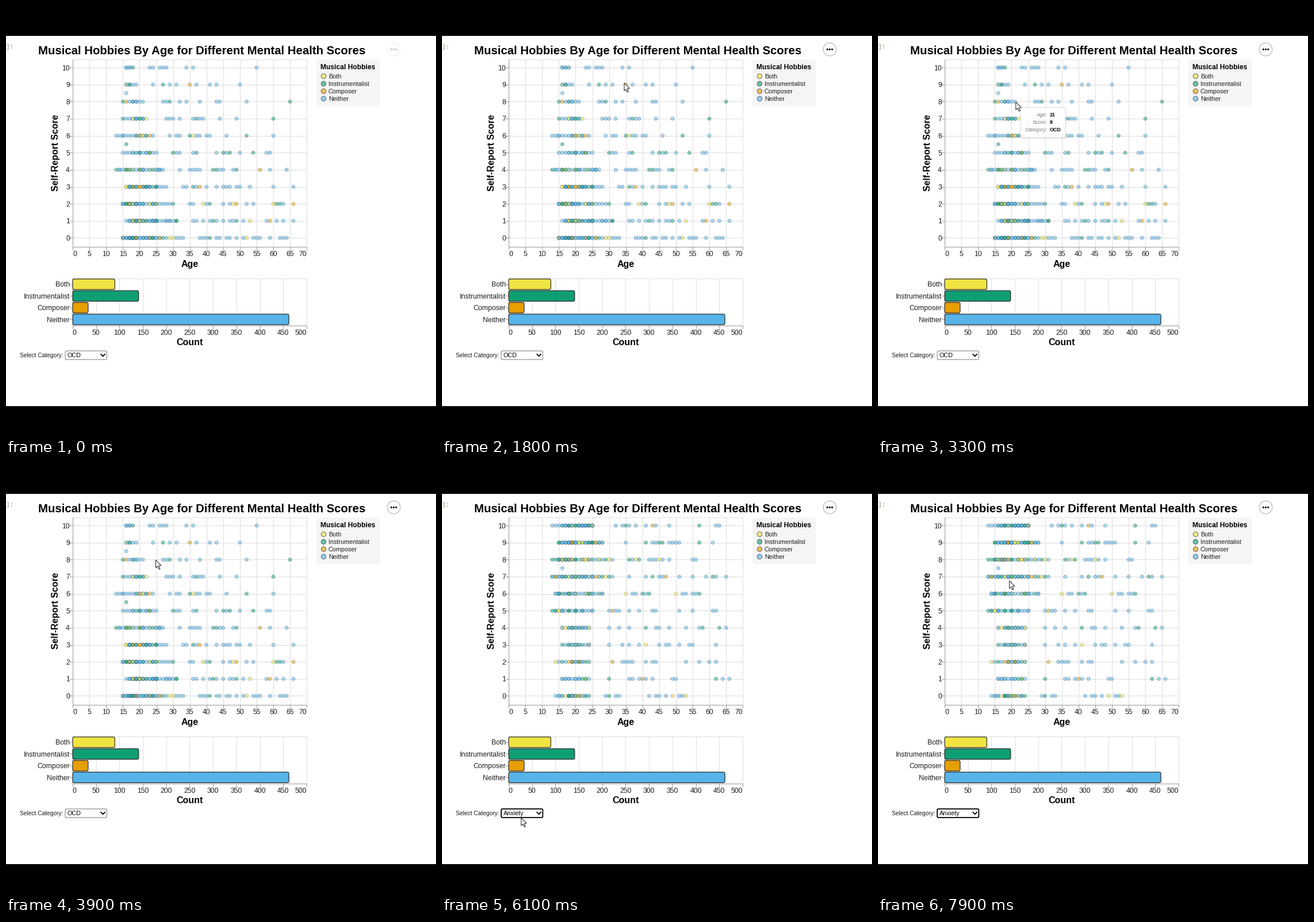
Recreate the animation shown at these times as a matplotlib script. Size 748 px wide and 748 px high, loop 8000 ms.

```python
import numpy as np
import matplotlib.pyplot as plt
from matplotlib.animation import FuncAnimation
from matplotlib.patches import Circle, FancyBboxPatch, Polygon, Rectangle
from matplotlib.transforms import Affine2D

SIZE, DPI = 748, 100
INTERVAL, FRAMES = 100, 80
PT = 72 / DPI
YELLOW, GREEN, ORANGE, BLUE = "#f0e442", "#0f9e73", "#e69f00", "#56b4e9"
GRID, AXIS, INK = "#dddddd", "#999999", "#1c1c1c"

plt.rcParams["font.family"] = "Liberation Sans"
fig = plt.figure(figsize=(SIZE / DPI, SIZE / DPI), dpi=DPI, facecolor="white")
ax = fig.add_axes([0, 0, 1, 1])
ax.set(xlim=(0, SIZE), ylim=(SIZE, 0))
ax.axis("off")


def text(x, y, s, px, ha="left", color=INK, **kw):
    return ax.text(x, y, s, fontsize=px * PT, ha=ha, va="baseline", color=color, **kw)


def line(xs, ys, color=GRID, width=1, z=1):
    return ax.plot(xs, ys, color=color, lw=width * PT, zorder=z)[0]


def box(x, y, w, h, r, fill, edge="none", width=1, z=2, **kw):
    style = f"round,pad=0,rounding_size={r}"
    patch = FancyBboxPatch((x, y), w, h, boxstyle=style, fc=fill, ec=edge,
                           lw=width * PT, zorder=z, **kw)
    return ax.add_patch(patch)


def age_x(age):
    return 116.2 + 5.814 * age


def score_y(score):
    return 403.4 - 29.63 * score


class Scores:
    """Each score has an unbroken run of young ages and a thinning tail of older ones."""

    def __init__(self, seed, oldest, crowd, tail, reach, halves):
        rng = np.random.default_rng(seed)
        self.marks = [(16, score, color) for score, color in halves]
        for score in range(11):
            last = int(oldest(score))
            for age in range(rng.integers(13, 17), last + 1):
                extra = rng.poisson(crowd(score) * np.exp(-((age - 19.5) / 6) ** 2))
                self.add(rng, [age] * (1 + extra), score, .6)
            older = np.arange(last + 5, 67)
            weight = np.exp(-(older - older[0]) / reach(score))
            ages = rng.choice(older, tail(score), replace=False, p=weight / weight.sum())
            self.add(rng, ages, score, .76)
        self.draw()

    def add(self, rng, ages, score, blue):
        rest = 1 - blue
        colors = rng.choice([YELLOW, GREEN, ORANGE, BLUE], len(ages),
                            p=[.3 * rest, .55 * rest, .15 * rest, blue])
        self.marks += [(int(age), score, str(c)) for age, c in zip(ages, colors)]

    def draw(self):
        ages, scores, colors = zip(*self.marks)
        self.xy = np.column_stack([age_x(np.array(ages)), score_y(np.array(scores))])
        self.dots = ax.scatter(*self.xy.T, s=(6.2 * PT) ** 2, c=[(c, .5) for c in colors],
                               edgecolors=[(.1, .2, .25, .27)], linewidths=.9 * PT, zorder=4)

    def hit(self, x, y):
        gap = np.hypot(self.xy[:, 0] - x, self.xy[:, 1] - y)
        nearest = gap.argmin()
        return self.marks[nearest] if gap[nearest] < 3.6 else None


DATA = {
    "OCD": Scores(4, oldest=lambda s: 33 - 1.5 * s, crowd=lambda s: 3 * np.exp(-s / 5),
                  tail=lambda s: 18 - s, reach=lambda s: 30 - 2.2 * s,
                  halves=[(8.5, BLUE), (5.5, GREEN)]),
    "Anxiety": Scores(9, oldest=lambda s: 24 + 8 * np.exp(-((s - 7.5) / 2) ** 2),
                      crowd=lambda s: .8 + .17 * s, tail=lambda s: 12, reach=lambda s: 24,
                      halves=[(7.5, BLUE)]),
}
OPTIONS = ["Anxiety", "Depression", "Insomnia", "OCD"]


def axis_label(x, y, value, last):
    """End labels are flush with the axis ends."""
    ha = "left" if value == 0 else "right" if value == last else "center"
    text(x, y, str(value), 12.2, ha)


def draw_scatter_frame():
    for age in range(0, 71, 5):
        x = age_x(age)
        line([x, x], [93, 418.5])
        line([x, x], [418.5, 423.5], AXIS)
        axis_label(x, 434.5, age, 70)
    for score in range(11):
        y = score_y(score)
        line([116, 523], [y, y])
        line([111.5, 116], [y, y], AXIS)
        text(111, y + 4.4, str(score), 12.2, "right")
    line([116, 523, 523], [93, 93, 418])
    line([116, 116, 523], [93, 418.5, 418.5], AXIS)
    text(319.7, 453.5, "Age", 16, "center", "black", weight="bold")
    text(91, 255.5, "Self-Report Score", 15.8, "center", "black", weight="bold",
         rotation=90, rotation_mode="anchor")


def draw_bars():
    for count in range(0, 501, 50):
        x = 116 + count * .814
        line([x, x], [474, 555.5])
        line([x, x], [555.5, 560.5], AXIS)
        axis_label(x, 571.5, count, 500)
    line([116, 523], [474, 474])
    line([116, 116, 523], [474, 555.5, 555.5], AXIS)
    bars = [("Both", YELLOW, 90), ("Instrumentalist", GREEN, 141),
            ("Composer", ORANGE, 33), ("Neither", BLUE, 462)]
    for i, (name, color, count) in enumerate(bars):
        y = 484 + 20.4 * i
        box(116, y - 9.2, count * .814, 18.4, 2.5, color, "#262626", 1.2, z=3)
        line([111.5, 116], [y, y], AXIS)
        text(111, y + 4.4, name, 12.25, "right")
        key_y = 122.2 + 13 * i
        ax.add_patch(Circle((552.5, key_y), 4.2, fc=(color, .6), ec=(.15, .15, .15, .65),
                            lw=PT, zorder=4))
        text(561, key_y + 3.8, name, 10.8)
    text(319.7, 590, "Count", 16, "center", "black", weight="bold")


ax.add_patch(Rectangle((0, 0), SIZE, 52, fc="black"))
ax.add_patch(Rectangle((0, 696), SIZE, 52, fc="black"))
text(-5.5, 73.5, "']:", 10.5, color="#8f866c", family="Liberation Mono")
text(340.5, 84, "Musical Hobbies By Age for Different Mental Health Scores", 20.33,
     "center", "black", weight="bold")
box(540, 93, 110.5, 81.5, 5, "#f5f5f5", z=1)
text(547, 110, "Musical Hobbies", 12.05, color="black", weight="bold")
draw_scatter_frame()
draw_bars()

# Menu button
menu = [ax.add_patch(Circle((674.5, 75.5), 11.3, fc="white", ec="#aaaaaa", lw=PT))]
menu += [ax.add_patch(Circle((674.5 + dx, 75.5), 1.6, fc="black", lw=0)) for dx in (-4.2, 0, 4.2)]

# Category select and its list
text(24, 611, "Select Category:", 10.3)
select = box(103, 600, 72.3, 15, 2, "white", "#767676")
choice = text(106.5, 611.3, "OCD", 10.8, color="black")
line([165.3, 168.6, 171.9], [605.8, 609.2, 605.8], "black", 1.8, z=3)
popup = [box(103, 616, 72.5, 66, 0, "white", "#767676", z=6)]
highlight = ax.add_patch(Rectangle((103.5, 617), 71.5, 16, fc="#1e6fd9", zorder=7))
labels = [text(106.5, 628.7 + 16 * i, name, 10.8, zorder=8) for i, name in enumerate(OPTIONS)]
popup += [highlight, *labels]

# Pointer and tooltip share one moving origin
shift = Affine2D()
moving = shift + ax.transData
pointer = ax.add_patch(Polygon(
    [(0, 0), (0, 13.6), (3.1, 10.8), (5.4, 16), (7.5, 15.1), (5.2, 10), (9.4, 9.6)],
    fc="white", ec="#222222", lw=PT, joinstyle="miter", zorder=12, transform=moving))
shadow = box(9.5, 11.5, 78, 52.5, 2, (0, 0, 0, .08), z=9, transform=moving)
card = box(8.3, 9.5, 78, 52.5, 2, (1, 1, 1, .96), "#d8d8d8", z=10, transform=moving)
tip = [shadow, card]
values = []
for i, key in enumerate(["Age:", "Score:", "Category:"]):
    y = 25 + 13 * i
    tip.append(text(54.5, y, key, 9, "right", "#808080", zorder=11, transform=moving))
    values.append(text(58.5, y, "", 8.9, color="black", weight="bold", zorder=11, transform=moving))
tip += values

ENTER, OPEN, PICK = 600, 5300, 6000
# Resting places of the pointer: time, x, y
STOPS = [(ENTER, 724, 592), (1800, 317, 134), (2500, 232, 166), (3000, 232.5, 167),
         (3900, 260.5, 167), (5200, 142, 607), (PICK, 134, 625), (6800, 222, 404),
         (7900, 228.5, 203)]


def pointer_at(t):
    for (t0, *start), (t1, *end) in zip(STOPS, STOPS[1:]):
        if t <= t1:
            break
    u = np.clip((t - t0) / (t1 - t0), 0, 1)
    return np.array(start) + (np.array(end) - start) * u * u * (3 - 2 * u)


def show(artists, on):
    for artist in artists:
        artist.set_visible(on)


def update(frame):
    t = frame * INTERVAL
    x, y = pointer_at(t)
    shift.clear().translate(x, y)
    pointer.set_visible(t >= ENTER)
    for part in menu:
        part.set_alpha(np.interp(t, [700, 1000], [.22, 1]))

    current = "Anxiety" if t >= PICK else "OCD"
    for name, scores in DATA.items():
        scores.dots.set_visible(name == current)
    choice.set_text(current)
    select.set_edgecolor("black" if t >= OPEN else "#767676")
    select.set_linewidth((1.8 if t >= OPEN else 1) * PT)

    show(popup, OPEN <= t < PICK)
    hover = int((y - 617) // 16) if y >= 617 else OPTIONS.index("OCD")
    highlight.set_y(617 + 16 * hover)
    for i, label in enumerate(labels):
        label.set_color("white" if i == hover else INK)

    mark = DATA[current].hit(x, y) if t >= ENTER else None
    show(tip, mark is not None)
    if mark:
        for part in (card, shadow):
            part.set_width(88 if current == "Anxiety" else 78)
        for value, content in zip(values, (mark[0], mark[1], current)):
            value.set_text(str(content))
    return []


anim = FuncAnimation(fig, update, frames=FRAMES, interval=INTERVAL, repeat=True,
                     repeat_delay=0, blit=False)
plt.show()
```
